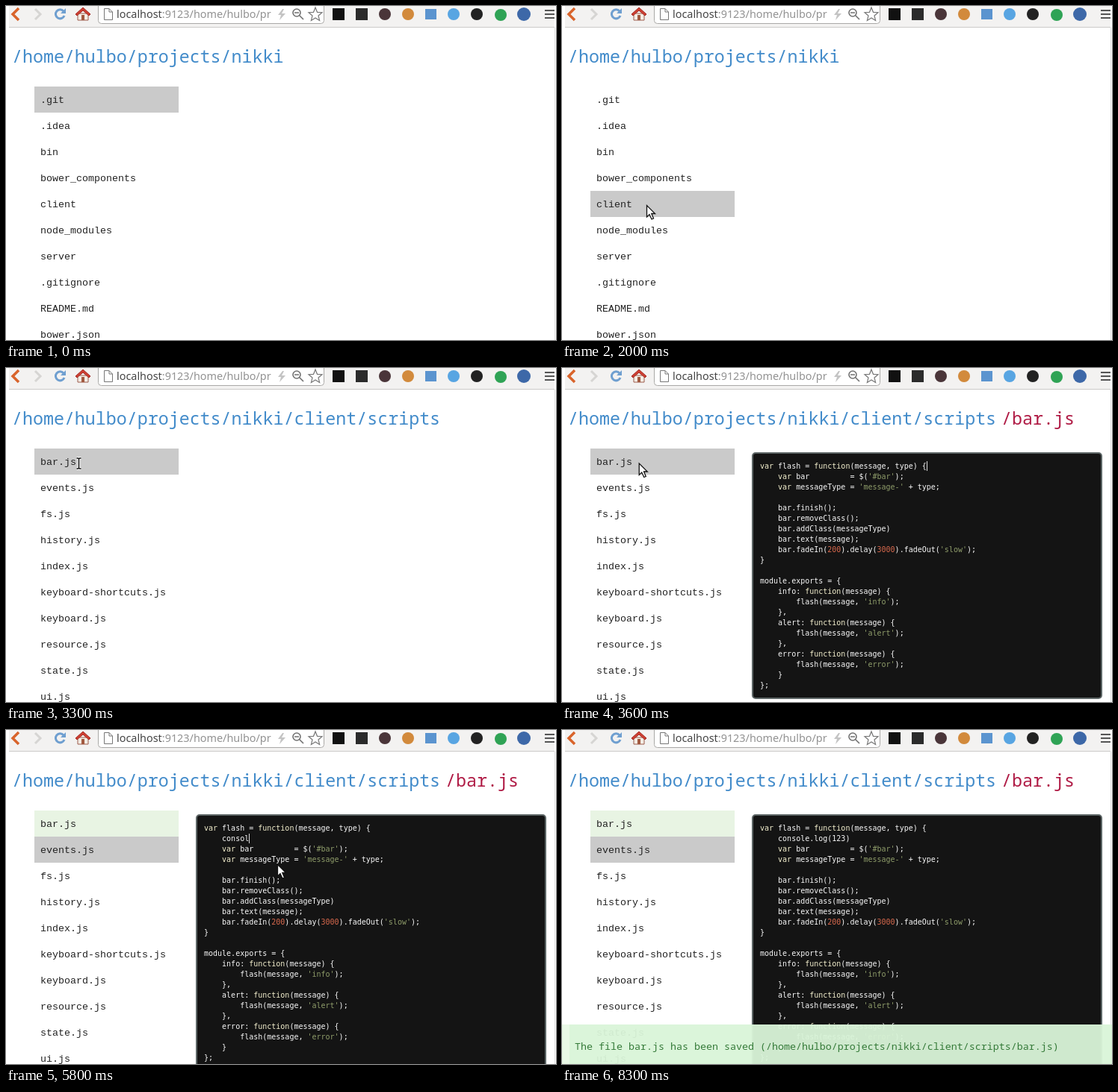
Write an HTML page with a canvas that moves like this. It is 736 px wide and 448 px high and loops after 8.4 s.

```html
<!DOCTYPE html>
<html lang="en">
<head>
<meta charset="utf-8">
<title>File browser</title>
<style>
  html, body { margin: 0; height: 100%; overflow: hidden; background: #fff; }
  canvas { display: block; }
</style>
</head>
<body>
<canvas id="stage" width="736" height="448"></canvas>
<script>
const ctx = document.getElementById('stage').getContext('2d');
const LOOP = 8400, STEP = 100;
const ROOT = '/home/hulbo/projects/nikki';
const MONO = '"Noto Sans Mono", "DejaVu Sans Mono", monospace';
const THIN = '"Liberation Mono", monospace';

const TIMES = { client: 2300, scripts: 3000, open: 3500, nextRow: 3700, enter: 4900, save: 7560, rest: 8000 };
const FOLDERS = [
  { from: 0, path: ROOT, files: ['.git', '.idea', 'bin', 'bower_components', 'client', 'node_modules',
    'server', '.gitignore', 'README.md', 'bower.json'] },
  { from: TIMES.client, path: ROOT + '/client', files: ['scripts', 'style', 'index.html'] },
  { from: TIMES.scripts, path: ROOT + '/client/scripts', files: ['bar.js', 'events.js', 'fs.js', 'history.js',
    'index.js', 'keyboard-shortcuts.js', 'keyboard.js', 'resource.js', 'state.js', 'ui.js'] }
];
const CODE = `var flash = function(message, type) {
    var bar         = $('#bar');
    var messageType = 'message-' + type;

    bar.finish();
    bar.removeClass();
    bar.addClass(messageType)
    bar.text(message);
    bar.fadeIn(200).delay(3000).fadeOut('slow');
}

module.exports = {
    info: function(message) {
        flash(message, 'info');
    },
    alert: function(message) {
        flash(message, 'alert');
    },
    error: function(message) {
        flash(message, 'error');
    }
};`.split('\n');
const TYPED = 'console.log(123';

// Pointer path: time, x, y
const PATH = [[900, 200, 163], [1300, 150, 225], [1600, 118, 294], [1900, 113, 267], [2300, 113, 267],
  [2700, 97, 195], [2900, 97, 120], [3500, 97, 120], [3800, 120, 150], [4200, 363, 180]];

const clamp = (v, lo, hi) => Math.max(lo, Math.min(hi, v));

function pointerAt(t) {
  const next = PATH.findIndex(p => p[0] > t);
  if (next === 0) return PATH[0].slice(1);
  if (next < 0) return PATH[PATH.length - 1].slice(1);
  const a = PATH[next - 1], b = PATH[next];
  const k = (1 - Math.cos(Math.PI * (t - a[0]) / (b[0] - a[0]))) / 2;
  return [a[1] + (b[1] - a[1]) * k, a[2] + (b[2] - a[2]) * k];
}

function typedCount(t) {
  if (t < 6400) return clamp(Math.floor((t - 5200) / 100), 0, 11);
  return clamp(11 + Math.floor((t - 6300) / 200), 11, TYPED.length);
}

function rect(x, y, w, h, color) {
  ctx.fillStyle = color;
  ctx.fillRect(x, y, w, h);
}

function box(x, y, w, h, r, fill, stroke, width = 1) {
  ctx.beginPath();
  ctx.roundRect(x, y, w, h, r);
  ctx.fillStyle = fill;
  ctx.fill();
  ctx.strokeStyle = stroke;
  ctx.lineWidth = width;
  ctx.stroke();
}

function dot(x, y, r, color) {
  ctx.beginPath();
  ctx.arc(x, y, r, 0, 7);
  ctx.fillStyle = color;
  ctx.fill();
}

function shape(d, x, y, fill, stroke, width = 1) {
  const path = new Path2D(d);
  ctx.save();
  ctx.translate(x, y);
  if (fill) { ctx.fillStyle = fill; ctx.fill(path); }
  if (stroke) { ctx.strokeStyle = stroke; ctx.lineWidth = width; ctx.stroke(path); }
  ctx.restore();
}

function text(s, x, y, size, family, color) {
  ctx.font = `${size}px ${family}`;
  ctx.fillStyle = color;
  ctx.fillText(s, x, y);
  return x + ctx.measureText(s).width;
}

function drawToolbar() {
  rect(4, 0, 730, 28, '#f3f2f1');
  rect(4, 28, 730, 1, '#cbcac8');
  shape('M17 3L9 11L17 19', 0, 0, null, '#d9642b', 3.5);
  shape('M39 4L46 11L39 18', 0, 0, null, '#d6d5d3', 3);
  shape('M77 7A6 6 0 1 0 78 13', 0, 0, null, '#6f9fd0', 3);
  shape('M80 3V10H73Z', 0, 0, '#6f9fd0');
  shape('M96 10H110V19H96Z', 0, 0, '#f4eee6', '#9b5a4a');
  shape('M93 11L103 2L113 11L111 13L103 6L95 13Z', 0, 0, '#cf3f32', '#a32d25');
  rect(101, 12, 4, 7, '#a2593f');

  box(123.5, -6.5, 302, 30, 4, '#fff', '#aaa9a7');
  shape('M131.5 3.5H138L142.5 8V18.5H131.5ZM138 3.5V8H142.5', 0, 0, '#fff', '#777');
  const sans = '"Noto Sans", "Open Sans", sans-serif';
  const end = text('localhost', 148, 16, 14.4, sans, '#444');
  text(':9123/home/hulbo/pr', end, 16, 14.4, sans, '#929292');
  shape('M370 4L364 12H368L366 19L374 10H369L372 4Z', 0, 0, '#c4c4c4');
  shape('M394 9A5 5 0 1 0 384 9A5 5 0 1 0 394 9M393 13L398 18M386 9H392', 0, 0, null, '#707070', 1.6);
  shape('M414 2L416.5 8.3L423 8.7L418 13L419.6 19.4L414 16L408.4 19.4L410 13L405 8.7L411.5 8.3Z',
    0, 0, '#fff', '#777', 1.2);

  rect(437, 3, 16, 16, '#111');
  rect(468, 3, 16, 16, '#2b2b2b');
  dot(507, 11, 8, '#4a3539');
  dot(538, 11, 8, '#d28a3c');
  rect(561, 4, 15, 14, '#5b94cf');
  dot(599, 11, 8, '#58a5e2');
  dot(630, 11, 8, '#222');
  dot(662, 12, 8, '#2fa355');
  dot(693, 11, 9, '#3d68a8');
  for (const y of [5, 10, 15]) rect(721, y, 13, 2, '#555');
  rect(734, 29, 1, 419, '#dedede');
}

function drawFiles(folder, selected, opened) {
  const end = text(folder.path, 8, 76, 23.3, MONO, '#428bca');
  if (opened) text('/bar.js', end + 7, 76, 23.3, MONO, '#b01c46');
  if (opened) rect(38, 108, 193, 35, '#e8f4e3');
  rect(38, 108 + selected * 35, 193, 35, '#cacaca');
  folder.files.forEach((name, i) => text(name, 46, 130 + i * 35, 13.33, THIN, '#222'));
}

function drawCodeLine(line, y) {
  for (const part of line.split(/('[^']*'|\b\d+\b|\bvar\b|\bfunction\b)/)) {
    const color = part[0] === "'" ? '#8f9d6a' : /^\d+$/.test(part) ? '#d9694d'
      : /^(var|function)$/.test(part) ? '#f5f1cf' : '#f8f8f8';
    if (part) drawCodeLine.x = text(part, drawCodeLine.x, y, 10, '"DejaVu Sans Mono", monospace', color);
  }
}

function drawEditor(t) {
  const count = typedCount(t), entered = t >= TIMES.enter;
  const lines = CODE.slice();
  if (entered) lines.splice(1, 0, '    ' + TYPED.slice(0, count) + (count > 11 ? ')' : ''));
  box(255, 114, 467, lines.length * 14 + 21, 4, '#141414', '#5d6666', 2);
  lines.forEach((line, i) => {
    drawCodeLine.x = 265;
    // The added call keeps one plain colour
    if (entered && i === 1) text(line, 265, 149, 10, '"DejaVu Sans Mono", monospace', '#f8f8f8');
    else drawCodeLine(line, 135 + i * 14);
  });
  if (t < TIMES.rest) {
    const column = entered ? 4 + count : CODE[0].length;
    rect(265 + Math.round(column * 6.02), entered ? 139 : 125, 1, 13, '#ddd');
  }
}

function drawNotice(t) {
  const k = clamp((t - TIMES.save) / 200, 0, 1);
  if (!k) return;
  ctx.globalAlpha = 0.95 * (1 - Math.cos(Math.PI * k)) / 2;
  rect(0, 395, 10, 53, '#e8f8e5');
  rect(10, 395, 726, 53, '#daf5d8');
  text(`The file bar.js has been saved (${ROOT}/client/scripts/bar.js)`, 17, 429, 13.33, MONO, '#2c7430');
  ctx.globalAlpha = 1;
}

function drawPointer(t, x, y) {
  if (t < 900 || t >= TIMES.rest) return;
  if (t >= 2900 && t < 3600) {
    const beam = 'M-3 1H-1L0 2L1 1H3M0 2V14M-3 15H-1L0 14L1 15H3';
    shape(beam, x + .5, y, null, '#fff', 3.5);
    shape(beam, x + .5, y, null, '#111', 1.5);
  } else {
    shape('M.5 .5V16L4 12.5L7 19L9.5 18L6.8 11.5H11.5Z', x, y, '#fff', '#111', 1.3);
  }
}

function draw(t) {
  rect(0, 0, 736, 448, '#fff');
  drawToolbar();
  const folder = FOLDERS.filter(f => f.from <= t).pop();
  const [x, y] = pointerAt(t);
  const hovered = clamp(Math.floor((y - 108) / 35), 0, folder.files.length - 1);
  const selected = t < 900 ? 0 : t >= TIMES.nextRow ? 1 : hovered;
  const opened = t >= TIMES.open;
  drawFiles(folder, selected, opened);
  if (opened) drawEditor(t);
  drawNotice(t);
  drawPointer(t, x, y);
}

const start = performance.now();
function frame() {
  const elapsed = (performance.now() - start) % LOOP;
  draw(Math.floor(elapsed / STEP) * STEP);
  requestAnimationFrame(frame);
}
frame();
</script>
</body>
</html>
```
